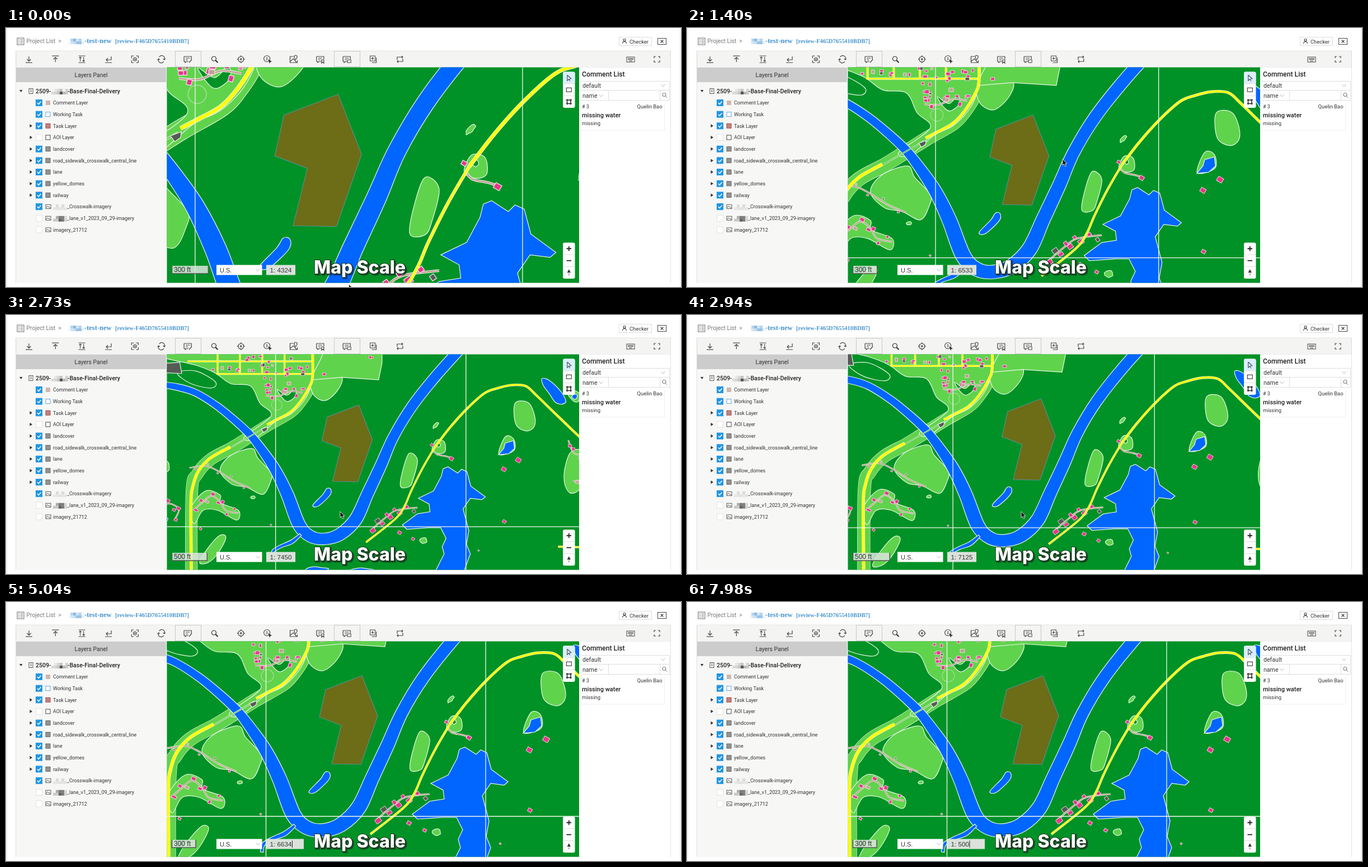
An HTML page that plays this animation: 1206x464 px, repeating every 8 s.

```html
<!DOCTYPE html>
<html lang="en">
<head>
<meta charset="utf-8">
<title>Map scale</title>
<style>
html, body { margin: 0; width: 100%; height: 100%; overflow: hidden; background: #fff; }
svg { display: block; width: 1206px; height: 464px; font-family: Roboto, Inter, sans-serif; fill: #333; }
.outlined { stroke: #e9f5e9; stroke-width: 1.2; vector-effect: non-scaling-stroke; }
.serif { font-family: "Liberation Serif", "Noto Serif", serif; font-weight: 700; fill: #4695cf; }
.sans { font-family: "Liberation Sans", Inter, sans-serif; }
.caption { font: 800 32px Inter, Lato, sans-serif; }
.strong { font-weight: 500; fill: #222; }
</style>
</head>
<body>
<svg id="stage" viewBox="0 0 1206 464" xmlns="http://www.w3.org/2000/svg"></svg>
<script>
const DURATION = 8000, STEP = 70;
const GREEN = '#009226', LIGHT = '#60d34c', BLUE = '#0066ff', YELLOW = '#ffff00',
      PINK = '#e8358c', TAN = '#bda294', DARK = '#555b55', INK = '#444', RULE = '#ddd';

// --- drawing helpers ---
const rect = (x, y, w, h, fill, extra = '') =>
  `<rect x="${x}" y="${y}" width="${w}" height="${h}" fill="${fill}" ${extra}/>`;
const frame = (x, y, w, h, color = INK, fill = 'none') => rect(x, y, w, h, fill, `stroke="${color}"`);
const ring = (x, y, r, color = INK) => `<circle cx="${x}" cy="${y}" r="${r}" fill="none" stroke="${color}" stroke-width="1.2"/>`;
const text = (x, y, size, str, extra = '') => `<text x="${x}" y="${y}" font-size="${size}" ${extra}>${str}</text>`;
const line = (d, color = INK, w = 1.2) => `<path d="${d}" fill="none" stroke="${color}" stroke-width="${w}"/>`;
const at = (x, y, body, angle = 0) => `<g transform="translate(${x} ${y}) rotate(${angle})">${body}</g>`;
const spread = (n, make) => Array.from({ length: n }, (_, i) => make(i)).join('');
const turned = (angles, body) => angles.map(a => at(0, 0, body, a)).join('');
const chevron = (x, y) => at(x, y, line('M-3.500-2 0 2 3.500-2', '#bbb', 1));

function randomizer(seed) {
  return () => (seed = (seed * 16807) % 2147483647) / 2147483647;
}

function points(str, size = 2) {
  const n = str.split(' ').map(Number);
  return Array.from({ length: n.length / size }, (_, i) => n.slice(i * size, i * size + size));
}

function spline(p, closed) {
  const n = p.length;
  const get = i => closed ? p[(i + n) % n] : p[Math.max(0, Math.min(n - 1, i))];
  let d = 'M' + p[0];
  for (let i = 0; i < (closed ? n : n - 1); i++) {
    const [a, b, c, e] = [get(i - 1), get(i), get(i + 1), get(i + 2)];
    d += `C${b.map((v, k) => v + (c[k] - a[k]) / 6)} ${c.map((v, k) => v - (e[k] - b[k]) / 6)} ${c}`;
  }
  return d;
}

// --- map features ---
const area = (d, fill) => `<path class="outlined" d="${d}" fill="${fill}"/>`;
const polygon = (str, fill) => area(`M${str}z`, fill);
const shape = (str, fill = LIGHT) => area(spline(points(str), true), fill);

function blob(x, y, rx, ry, angle, seed, fill = LIGHT) {
  const rnd = randomizer(seed);
  const ringPoints = Array.from({ length: 11 }, (_, i) => {
    const a = i * 2 * Math.PI / 11, r = .85 + rnd() * .3;
    return [rx * r * Math.cos(a), ry * r * Math.sin(a)];
  });
  return at(x, y, area(spline(ringPoints, true), fill), angle);
}

// A ribbon of changing width around a center line given as x, y, width.
function ribbon(str, fill) {
  const p = points(str, 3);
  const side = sign => p.map(([x, y, w], i) => {
    const a = p[Math.max(0, i - 1)], b = p[Math.min(p.length - 1, i + 1)];
    const dx = b[0] - a[0], dy = b[1] - a[1], k = sign * w / 2 / Math.hypot(dx, dy);
    return [x - dy * k, y + dx * k];
  });
  const back = spline(side(-1).reverse()).replace('M', 'L');
  return area(spline(side(1)) + back + 'z', fill);
}

function road(str, w, color = YELLOW) {
  const d = spline(points(str));
  return line(d, '#f2f2e6', w + 1.4) + line(d, color, w);
}

const house = (x, y, w, h, angle, fill = PINK) =>
  at(x, y, rect(-w / 2, -h / 2, w, h, fill, 'stroke="#f6dce8" stroke-width=".9"'), angle);

function houses(count, seed, angle, size, place) {
  const rnd = randomizer(seed);
  return spread(count, () => {
    const [x, y] = place(rnd);
    const kind = rnd();
    return house(x, y, size * (.6 + rnd() * .7), size * (.6 + rnd() * .5), angle,
      kind < .8 ? PINK : kind < .92 ? TAN : DARK);
  });
}

// A driveway with houses on both sides.
function street(str, count, seed, angle, size = 7) {
  const p = points(str);
  let i = 0;
  return road(str, 1.8, TAN) + houses(count, seed, angle, size, rnd => {
    const t = (i++ + .5) / count * (p.length - 1), k = Math.floor(t), f = t - k;
    const off = (i % 2 ? 1 : -1) * (4 + rnd() * 4);
    return [p[k][0] + (p[k + 1][0] - p[k][0]) * f, p[k][1] + (p[k + 1][1] - p[k][1]) * f + off];
  });
}

function town() {
  const block = (n, seed, x, y, w, h) => houses(n, seed, 0, 6, rnd => [x + rnd() * w, y + rnd() * h]);
  return [
    polygon('506 -10 684 -10 684 45 677 80 600 75 541 80', LIGHT),
    shape('220 -10 540 -10 540 75 527 117 497 150 462 168 420 203 400 198 455 155 432 128 413 93 372 88 340 66 300 50 220 28'),
    shape('468 100 488 112 504 98 506 113 490 125 478 117', GREEN),
    shape('262 66 300 62 340 84 332 97 290 88', GREEN),
    polygon('221 47 267 44 271 67 221 65', DARK),
    [12, 42, 68].map((y, i) => road(`${223 + i * 60} ${y} 541 ${y}`, 2.6)).join(''),
    spread(4, i => road(`${345 + i * 46} 8 ${345 + i * 46} 68`, 2.6)),
    street('445 113 470 114 495 104 520 107', 3, 19, 15),
    block(44, 71, 320, 0, 215, 66), block(18, 55, 442, 66, 80, 44), block(4, 91, 565, 20, 105, 50),
    ring(467, 132, 11, '#9fdc96')
  ].join('');
}

function greenery() {
  return [
    road('540 70 533 97 515 126 495 147 447 175 400 205 372 222 330 245 303 275 292 310 291 480', 24, LIGHT),
    shape('370 238 415 222 428 242 455 272 454 291 438 317 405 302 375 296 350 268'),
    shape('290 345 320 310 350 318 352 335 388 350 384 370 345 350 315 350 297 378'),
    shape('349 402 362 407 345 440 325 458 308 458 322 432'),
    shape('541 70 598 71 595 98 567 123 541 108'),
    shape('740 232 757 246 748 286 740 301 722 300 727 266'),
    shape('796 205 812 208 814 228 800 233 787 225'),
    blob(801, 215, 4, 4, 0, 8, GREEN), blob(795, 174, 8, 3, -45, 4), blob(769, 412, 8, 6, 0, 6),
    shape('958 129 985 127 998 152 998 176 982 186 960 172'),
    shape('938 198 955 202 956 226 925 234'),
    blob(234, 259, 13, 14, 0, 11), blob(1083, 270, 27, 45, 10, 23), blob(1110, 170, 14, 35, -10, 31),
    blob(1081, 113, 15, 10, 40, 5), blob(418, 323, 5, 3, 0, 3)
  ].join('');
}

function water() {
  return [
    ribbon('200 86 9 261 95 14 300 107 14 345 135 15 385 168 16 415 197 17 440 230 20 465 268 23 489 318 26 513 380 27 537 404 25 566 409 24 598 399 26 630 368 27 654 316 25 682 256 24 707 199 22 745 136 22 797 70 22 860 0 22', BLUE),
    ribbon('516 400 5 498 415 8 476 424 6 460 434 6 457 448 5', BLUE),
    polygon('820 260 840 273 848 265 859 270 867 300 897 322 890 328 866 325 851 347 863 392 858 420 866 440 850 484 790 484 812 440 808 425 816 408 805 386 780 386 735 389 726 380 757 357 783 353 781 337 759 325 790 310 806 280 810 264', BLUE),
    shape('542 338 562 317 570 305 578 306 577 318 557 338 546 343', BLUE),
    polygon('938 211 955 206 957 222 945 233 924 235 935 222', BLUE),
    blob(1040, 106, 35, 12, 52, 9, BLUE), blob(1081, 115, 6, 5, 0, 2, BLUE),
    blob(231, 372, 12, 9, -50, 7, BLUE), blob(550, 475, 24, 8, 0, 13, BLUE), blob(644, 477, 28, 8, 0, 14, BLUE)
  ].join('');
}

function settlements() {
  const single = ([x, y, size]) => house(x, y, size, size * .85, 30);
  return [
    street('287 262 320 258 345 268 380 290 412 304', 5, 27, 20, 4),
    street('295 350 312 335 332 320 350 332 362 350 388 356', 8, 33, 25),
    street('220 346 245 336 265 348 256 370', 5, 35, 25),
    street('660 392 690 366 713 350 757 344', 9, 41, -35, 8),
    street('1068 205 1080 232 1110 240 1108 280 1078 290', 7, 51, 5),
    road('789 225 797 234 815 238 828 242', 1.8, TAN),
    points('935 265 9 965 246 10 936 373 7 787 215 6 827 243 8 883 433 3 310 388 5 748 409 6 720 396 7 455 380 3', 3).map(single).join('')
  ].join('');
}

function mainRoads() {
  return [
    road('444 178 408 199 372 220', 1.3, '#54bd45'),
    road('651 416 712 367 731 340 744 310 768 262 793 219', 2.8),
    road('793 219 823 180 858 141 895 108 920 98 950 91 980 93 1002 112 1041 150 1119 225', 3.6),
    road('540 0 541 71 533 97 515 126 495 147 470 161 447 173', 4.2),
    road('371 219 330 242 306 268 294 300 290 340 291 490', 5),
    road('1047 425 1125 427', 3),
    polygon('435 182 448 177 447 184 440 189', DARK)
  ].join('');
}

const task = `<path d="M636 132 571 157 560 206 599 221 582 290 634 291 664 204z" fill="#6c6d16"
  stroke="#598d91" stroke-width="1.2" vector-effect="non-scaling-stroke"/>`;
const grid = `<path d="M464.500-50V550M857-50V550M150 384H1200" stroke="#f4f8f4" stroke-width="1.3"
  vector-effect="non-scaling-stroke"/>`;

// --- interface ---
const arrow = line('M0-5V3M-3.500 0 0 3.500 3.500 0');
const thinArrow = line('M0-4V4M-2 2 0 4 2 2', INK, 1.1);
const corners = r => turned([0, 90, 180, 270], line(`M${-r} -2V${-r}H-2`));
const bubble = line('M-7-5H6V0M1 4H-2L-5 6V4H-7V-5M-4-2H3M-4 1H0');
const icons = [
  arrow + line('M-6 6H6'),
  at(0, 0, arrow + line('M-6 6H6'), 180),
  line('M-6-6H6M-6 6H6') + at(-3, 0, thinArrow, 180) + at(3, 0, thinArrow),
  line('M-6 6H6M5-5V1H-4M-1-2-4 1-1 4'),
  corners(6) + ring(0, 0, 3) + ring(0, 0, .6),
  turned([0, 180], line('M5 1A5 5 0 0 0-4-4M3-1 5 1 7-1')),
  bubble + line('M2 6 7 0'),
  ring(-1, -1, 4, '#333') + line('M2 2 6 6', '#333', 2.2),
  ring(0, 0, 5) + ring(0, 0, 1.3) + turned([0, 90, 180, 270], line('M0-7V-4')),
  ring(-1, -1, 5.5) + line('M-1-4V2') + '<path d="M1 0 8 4 5 5 4 8z"/>',
  line('M-1-5H-7V6H6V2M-7 4-1-1 5 6M3 1C-1-4 0-7 3-7S7-4 3 1z'),
  bubble + line('M2 1H6V7L4 5 2 7z'),
  bubble + frame(1, 1, 6, 5),
  frame(-6, -6, 9, 9) + line('M5-3V6H-3M-1.500-4V1M-4-1.500H1'),
  turned([0, 180], line('M-5 1V-4H5M3-6 5-4 3-2'))
];
const keyboard = frame(-7, -4, 14, 9) + line('M-5-1.500H5M-5 .5H5M-3 3H3');

function mosaic(x, y, columns, color, seed) {
  const rnd = randomizer(seed);
  return spread(columns * 2, i => {
    const c = i % columns, middle = Math.sin(Math.PI * (c + .5) / columns);
    return rect(x + c * 5, y + (i < columns ? 0 : 5), 5, 5, color, `opacity="${middle * rnd() * .8}"`);
  });
}

function header() {
  return [
    line('M1.500 0V464M1204.500 0V464', '#e6e6e6', 1),
    frame(20, 18, 12, 12, '#666'),
    spread(3, i => line(`M22 ${21 + i * 3}h2m1.500 0h4.500`, '#666', 1)),
    text(36.5, 27, 10.3, 'Project List &#160;&gt;', 'fill="#777"'),
    mosaic(110, 19, 6, '#3f8fd0', 5),
    text(140, 27, 12.5, '-test-new', 'class="serif"'),
    text(195, 27, 10.4, '[review-F465D7655410BDB7]', 'class="serif"'),
    frame(1095.5, 16.5, 58, 15, RULE),
    ring(1105, 21.5, 2), line('M1101.500 28C1102 23 1108 23 1108.500 28'),
    text(1114, 27.5, 9.4, 'Checker'),
    frame(1164.5, 18.5, 15, 11), at(1172, 24, turned([45, 135], line('M-3.500 0H3.500'))),
    frame(17.5, 41.5, 1170, 415, '#e2e2e2'),
    rect(18, 41, 1169, 30, '#f4f4f3', `stroke="${RULE}" stroke-width=".7"`),
    ...[302.5, 586.5].map(x => frame(x, 41.5, 46, 28, '#c8c8c8')),
    ...icons.map((icon, i) => at(41 + i * 47.35, 56, icon)),
    at(1116, 56, keyboard), at(1163, 56, corners(5))
  ].join('');
}

const tile = color => frame(0, -4, 8, 8, color, '#ccc') + line('M0-1.500H8M0 1.500H8M2.500-4V4M5.500-4V4', color, .8);
const layerIcons = {
  fill: rect(0, -4, 8, 8, '#cbb8b0'),
  box: frame(0, -4, 8, 8, '#64a5d8', '#fff'),
  dark: frame(0, -4, 8, 8, '#444', '#fff'),
  red: tile('#a33'),
  tile: tile('#555'),
  image: frame(0, -3.5, 9, 7, '#555', '#fff') + line('M1 2 3-1 5 1 6 0 8 3', '#555', 1)
};
const group = (name, icon = 'tile', on = true) => ({ name, icon, on, open: true });
const leaf = (name, icon, on = false, hidden = false) => ({ name, icon, on, hidden });
const layers = [
  leaf('Comment Layer', 'fill', true), leaf('Working Task', 'box', true),
  group('Task Layer', 'red'), group('AOI Layer', 'dark', false), group('landcover'),
  group('road_sidewalk_crosswalk_central_line'), group('lane'), group('yellow_domes'), group('railway'),
  leaf('_Crosswalk-imagery', 'image', true, true), leaf('_lane_v1_2023_09_29-imagery', 'image', false, true),
  leaf('imagery_21712', 'image')
];

function layerRow({ name, icon, on, open, hidden }, i) {
  return at(0, 134 + i * 20.68, [
    open ? '<path d="M42.500-3 47 0 42.500 3z"/>' : '',
    on ? frame(53.5, -5.5, 11, 11, '#2196e3', '#2196e3') + line('M56 0 58.300 2.500 62.500-2.500', '#fff', 1.5)
       : frame(53.5, -5.5, 11, 11, '#e3e3e3', '#fff'),
    at(71, 0, layerIcons[icon]),
    hidden ? mosaic(84, -4, 5, on ? '#999' : '#333', 40 + i) : '',
    text(hidden ? 109 : 84, 3.2, 8.9, name)
  ].join(''));
}

function leftPanel() {
  return [
    rect(18, 71, 269, 386, '#f7f7f6'), rect(18, 71, 268, 26, '#ccc'),
    text(152, 87.5, 10.4, 'Layers Panel', 'text-anchor="middle"'),
    '<path d="M24 111H29.500L26.800 115z"/>',
    frame(41, 108.5, 7, 9, '#555', '#fff'), line('M43 111H46M43 113.500H46', '#555', 1),
    text(53, 117, 10.5, '2509-', 'class="strong"'),
    mosaic(81, 109, 6, '#222', 77),
    text(110, 117, 10.5, '-Base-Final-Delivery', 'class="strong"'),
    ...layers.map(layerRow)
  ].join('');
}

function rightPanel() {
  return [
    rect(1024, 71, 163, 386, '#fff'),
    text(1029, 87, 12.2, 'Comment List', 'class="strong"'),
    line('M1026 95.500H1185.500V129.500H1026M1026 111.500H1186M1076.500 112V129M1168.500 112V129', RULE, 1),
    line('M1176.500 135V183H1026', '#eee', 1),
    text(1030, 106.5, 10.6, 'default'), chevron(1174, 103),
    text(1030, 124.5, 10.6, 'name'), chevron(1063, 121),
    ring(1176, 119.5, 3, '#888'), line('M1178 122 1181.500 125', '#888', 1),
    text(1029, 143.5, 9, '# 3'),
    text(1172.5, 143.5, 9.4, 'Quelin Bao', 'text-anchor="end"'),
    text(1029, 159.5, 11, 'missing water', 'class="strong"'),
    text(1029, 174, 9.4, 'missing')
  ].join('');
}

function buttonStack(y, cells) {
  return at(1005.75, y, rect(-10.75, 0, 21.5, 64.5, '#fff', 'rx="3"')
    + cells.map((cell, i) => (i ? line(`M-10.700 ${i * 21.5}H10.700`, RULE, 1) : '') + at(0, 10.75 + i * 21.5, cell)).join(''));
}

const pointerShape = '<path d="M0 0V11L2.500 8.800 4.500 13 6.500 12 4.600 8H8z" fill="#111" stroke="#fff" stroke-width=".8"/>';
const selectTool = rect(-10.75, -10.75, 21.5, 21, '#dceefb', 'rx="3"') + line('M-3-5V5L0 2.500 2 6M-3-5 4 1.500 0 2.500', '#456');
const nodeTool = turned([0, 90, 180, 270], line('M-5-3.200H5', '#222', 1.5));
const compass = '<path d="M0-6 3.200 0H-3.200z"/><path d="M0 6 2.200 1.500H-2.200z" fill="#bbb"/>';

document.getElementById('stage').innerHTML = `
  <defs><clipPath id="mapArea">${rect(287.5, 70.5, 736.5, 386, '#fff')}</clipPath></defs>
  ${rect(0, 0, 1206, 464, '#fff')}
  ${header()}${leftPanel()}
  <g clip-path="url(#mapArea)">
    ${rect(287, 70, 738, 388, GREEN)}
    <g id="world">${greenery()}${town()}${water()}${settlements()}${mainRoads()}${task}${grid}</g>
  </g>
  ${rightPanel()}
  ${buttonStack(78.5, [selectTool, frame(-4.5, -3.5, 9, 7, '#222'), nodeTool])}
  ${buttonStack(384.5, [line('M-4.200 0H4.200M0-4.200V4.200', '#222', 1.8), line('M-4.200 0H4.200', '#222', 1.8), compass])}
  <g class="sans">
    <rect id="barBox" x="296" y="426" height="14" fill="#dce6dd" fill-opacity=".85"/>
    <path id="barLine" fill="none" stroke="#555" stroke-width="1.5"/>
    <text id="barText" x="300" y="437" font-size="12"></text>
    ${rect(376, 424.5, 81.5, 18, '#fff')}${text(382, 437.5, 11, 'U.S.')}${chevron(450, 433.5)}
    <rect id="scaleBox" x="465" y="424.5" height="18" fill="#dbe2dc"/>
    ${text(471.5, 437.5, 11.7, '1:')}
    <text id="scaleText" x="484.5" y="437.5" font-size="11.7"></text>
    <path id="caret" stroke="#222"/>
  </g>
  <g class="caption">
    ${text(552, 442, 32, 'Map Scale', 'fill="#222" opacity=".65" stroke="#222" stroke-width="3"')}
    ${text(550, 440, 32, 'Map Scale', 'fill="#fff" stroke="#1c3520" stroke-width="2" paint-order="stroke"')}
  </g>
  <g id="pointer">${pointerShape}</g>`;

// --- motion ---
const $ = id => document.getElementById(id);
const set = (id, attrs) => { for (const k in attrs) $(id).setAttribute(k, attrs[k]); };
const mix = (a, b, p) => a + (b - a) * p;
function ease(t, from, to) {
  const p = Math.max(0, Math.min(1, (t - from) / (to - from)));
  return p * p * (3 - 2 * p);
}

// Each zoom keeps the map point `anchor` under the screen point `pivot`.
const zoomOut = { start: 740, end: 1850, log: [.399, -.2], scale: [4324, 7774], pivot: [671, 235], anchor: [688, 210] };
const zoomIn = { start: 2350, end: 3430, log: [-.2, 0], scale: [7774, 6634], pivot: [593, 350], anchor: [593, 350] };

const pointerMoves = [
  { start: 0, end: 700, to: [671, 235] },
  { start: 1800, end: 2100, to: [431, 454] },
  { start: 2110, end: 2380, to: [597, 352] },
  { start: 3430, end: 3710, to: [563, 470] }
];

const FOCUS = 4690, ERASE = 5600, TYPE = 6580;

function fieldValue(t, scale) {
  if (t < ERASE) return String(Math.round(scale));
  if (t < TYPE) return '6634'.slice(0, Math.max(0, 3 - Math.floor((t - ERASE) / 140)));
  return '500'.slice(0, 1 + Math.floor((t - TYPE) / 315));
}

function draw(time) {
  const t = Math.floor(time / STEP) * STEP;
  const zoom = t < zoomIn.start ? zoomOut : zoomIn;
  const p = ease(t, zoom.start, zoom.end);
  const s = Math.exp(mix(...zoom.log, p)), scale = mix(...zoom.scale, p);
  const [x, y] = zoom.pivot.map((v, k) => v - zoom.anchor[k] * s);
  set('world', { transform: `translate(${x} ${y}) scale(${s})` });

  const ratio = 6634 / scale, feet = ratio < .95 ? 500 : 300, width = feet * .14 * ratio;
  set('barBox', { width: width + 1 });
  set('barLine', { d: `M296.500 426V440H${297 + width}V426` });
  $('barText').textContent = feet + ' ft';

  const value = fieldValue(t, scale), focused = t >= FOCUS, caretX = 485.5 + value.length * 6.5;
  $('scaleText').textContent = value;
  set('scaleBox', { width: focused ? 67 : 52 });
  set('caret', { d: `M${caretX} 427.500V440`, opacity: +(focused && (t - FOCUS) % 1060 < 530) });

  const tip = pointerMoves.reduce((pos, m) =>
    pos.map((v, k) => mix(v, m.to[k], ease(t, m.start, m.end))), [612.5, 459]);
  set('pointer', { transform: `translate(${tip})` });
}

function loop(now) {
  draw(now % DURATION);
  requestAnimationFrame(loop);
}
draw(0);
requestAnimationFrame(loop);
</script>
</body>
</html>
```
